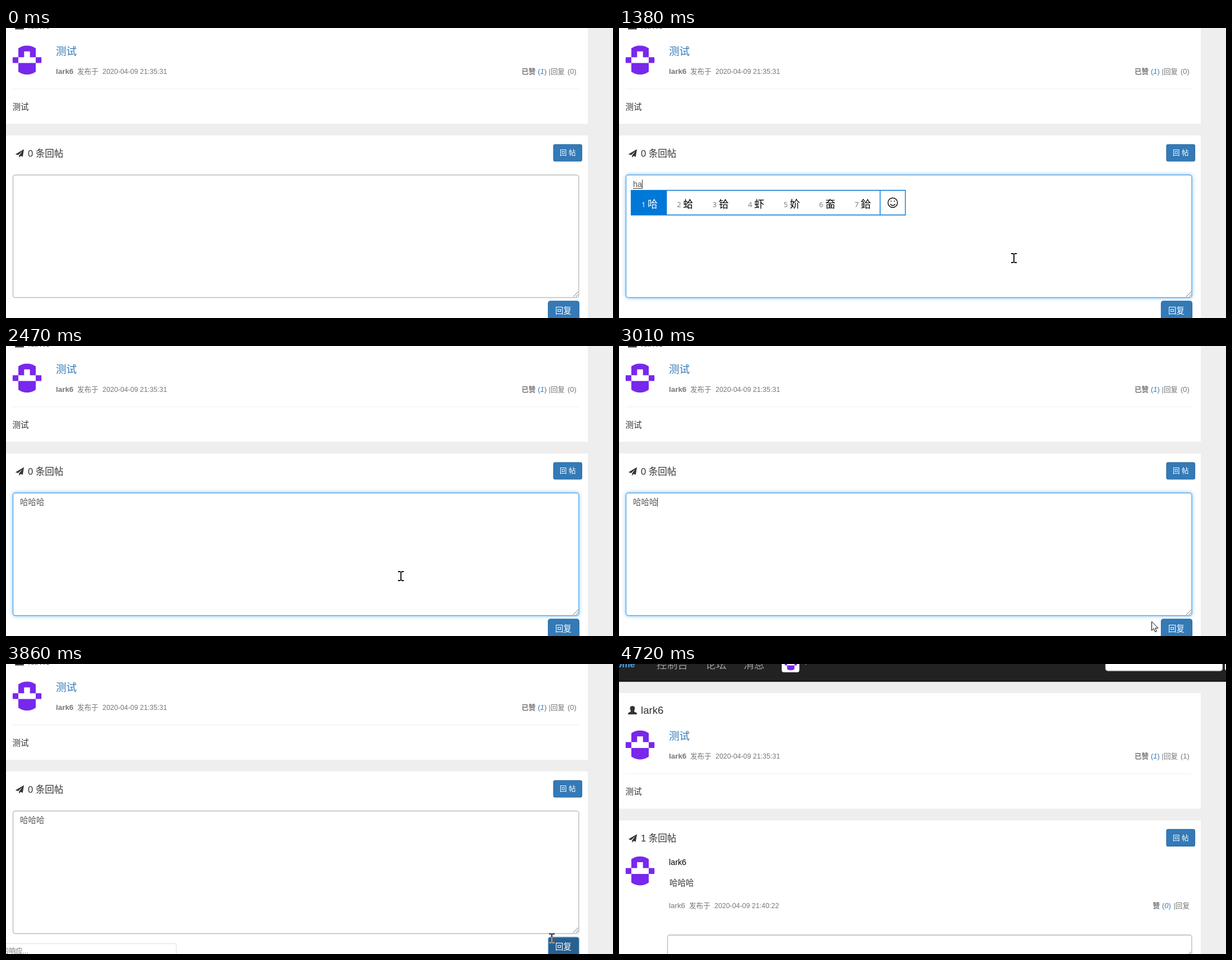
An HTML page that plays this animation: 1082x518 px, repeating every 5270 ms.

```html
<!DOCTYPE html>
<html lang="zh-CN">
<head>
<meta charset="utf-8">
<title>回帖</title>
<style>
html, body { margin: 0; height: 100%; overflow: hidden; background: #eee; }
svg { display: block; }
text { font: 12.6px "Liberation Sans", "Noto Sans CJK SC", "Noto Sans CJK", sans-serif; fill: #777; white-space: pre; }
.body { font-size: 14.5px; fill: #333; }
.head { font-size: 16.5px; fill: #333; }
.title { font-size: 18.6px; fill: #337ab7; }
.name { font-size: 13.4px; }
.date { font-size: 12.4px; }
.side { font-size: 12.9px; }
.nav { font-size: 18.7px; fill: #9d9d9d; }
.bold { font-weight: bold; }
.link { fill: #337ab7; }
.white { fill: #fff; }
.link tspan { font-style: italic; }
.btn { fill: #337ab7; stroke: #2e6da4; stroke-width: 1.2; }
.box { fill: #fff; stroke: #bbb; stroke-width: 1.4; }
.num { font: 13px "Open Sans", "Noto Sans", sans-serif; fill: #767676; }
.word { font-size: 18px; fill: #000; }
.first { fill: #fff; }
#beam { mix-blend-mode: difference; }
</style>
</head>
<body>
<svg width="1082" height="518" viewBox="0 0 1082 518">
  <defs>
    <clipPath id="round"><circle r="26"/></clipPath>
    <path id="avatar" clip-path="url(#round)" fill="#7828ec"
      d="M-15.5-26h31v21h-10.3v-10.4h-10.4v10.4h-10.3zM-26-5h10.5v10.4h-10.5zM15.5-5h10.5v10.4h-10.5zM-15.5 5.4h31v21h-31z"/>
    <path id="grip" d="M0 9L9 0M5 9l4-4" stroke="#777" fill="none"/>
  </defs>
  <rect width="1082" height="518" fill="#eee"/>

  <g id="shared">
    <rect y="-35.4" width="1037" height="206.4" fill="#fff"/>
    <rect y="192" width="1037" height="400" fill="#fff"/>
    <path fill="#333" d="M24-12.5c5 0 5 4 3.500 7.500-.8 2-.8 2.500 1 3.300 2.500 1 3.500 1.500 3.500 4.200h-16c0-2.700 1-3.200 3.500-4.200 1.800-.8 1.800-1.300 1-3.300-1.500-3.500-1.500-7.500 3.500-7.500z"/>
    <text class="title" style="fill:#333" x="39" y="1.300">lark6</text>
    <use href="#avatar" x="37.500" y="57.200"/>
    <text class="title" x="89" y="48">测试</text>
    <text class="name bold" x="89" y="81.800">lark6</text>
    <text x="127" y="81.600">发布于</text>
    <text class="date" x="172" y="81.600">2020-04-09 21:35:31</text>
    <text class="bold" x="919" y="81.600">已赞</text>
    <text class="side link" x="948" y="81.600">(<tspan>1</tspan>)</text>
    <text class="side" x="967.500" y="81.600">|</text>
    <text x="971" y="81.600">回复</text>
    <text class="side" id="replies" x="1016.700" y="81.600" text-anchor="end"></text>
    <path d="M12 108.700H1021" stroke="#eee"/>
    <text class="body" x="11.500" y="145.500">测试</text>
    <path fill="#333" d="M32 216.500L16.800 225.500l4.700 1.600 8-7.300-6.300 8 .1 3.700 2.700-2.900 3.800 1.400z"/>
    <text class="head" id="count" x="39" y="229.800"></text>
    <rect class="btn" x="976" y="208" width="50.500" height="30" rx="3"/>
    <text class="white" x="987" y="227.300">回 帖</text>
  </g>

  <g id="form">
    <rect class="box" id="area" x="12.500" y="262.500" width="1008.500" height="219" rx="4"/>
    <path id="inset" d="M15 264H1019" stroke="#f0f0f0"/>
    <use href="#grip" x="1011" y="471"/>
    <text class="body" id="typed" style="fill:#555" x="25" y="284"></text>
    <path id="under" stroke="#333" fill="none"/>
    <rect id="caret" y="271" width="1" height="16" fill="#333"/>
    <g id="ime"></g>
    <rect class="btn" id="send" x="966.500" y="487.800" width="55" height="36" rx="4"/>
    <text class="body white" x="979" y="510.300">回复</text>
  </g>

  <g id="posted">
    <rect width="1082" height="30.500" fill="#222"/>
    <rect y="30" width="1082" height="1.700" fill="#080808"/>
    <text class="bold" style="font-size:16px;fill:#4aa3e8" x="28.500" y="6" text-anchor="end">Home</text>
    <text class="nav" x="67" y="7.500">控制台</text>
    <text class="nav" x="154" y="7.500">论坛</text>
    <text class="nav" x="222" y="7.500">消息</text>
    <rect x="290" y="-17" width="31.500" height="31.700" rx="4" fill="#fff"/>
    <use href="#avatar" transform="translate(306.200 .3) scale(.42)"/>
    <path d="M329-2.500h8l-4 4z" fill="#9d9d9d"/>
    <rect class="box" x="867.500" y="-20" width="208" height="32" rx="4" style="stroke:#ccc"/>
    <rect x="1080" y="-20" width="20" height="32" rx="4" fill="#fff"/>
    <use href="#avatar" x="37.500" y="369.500"/>
    <text class="body" style="font-size:14.300px;fill:#000" x="89" y="358.700">lark6</text>
    <text class="body" x="90" y="395.500">哈哈哈</text>
    <text class="name" x="89" y="436.200">lark6</text>
    <text x="125" y="436">发布于</text>
    <text class="date" x="170" y="436">2020-04-09 21:40:22</text>
    <text class="bold" x="951.500" y="436">赞</text>
    <text class="side link" x="968" y="436">(<tspan>0</tspan>)</text>
    <text x="1017" y="436" text-anchor="end">|回复</text>
    <rect class="box" x="86.500" y="484" width="934.500" height="40" rx="4"/>
    <path d="M88 485.500H1019" stroke="#f0f0f0"/>
    <use href="#grip" x="1011" y="514"/>
  </g>

  <g id="status">
    <rect x="-5" y="499.500" width="308.500" height="30" rx="3" fill="#fff" stroke="#ddd"/>
    <text class="date" x="-7.500" y="517">的响应...</text>
  </g>

  <circle id="click" r="13" fill="#ffe600" fill-opacity=".55"/>
  <path id="beam" d="M-5-8h4M1-8h4M-5 8h4M1 8h4M0-8V8" stroke="#fff" stroke-width="1.800" fill="none"/>
  <path id="arrow" d="M0 0v16l3.700-3.500 2.500 6 2.600-1.100-2.500-5.700h5.200z" fill="#fff" stroke="#000"/>
  <path id="hand" d="M-1.500 1c0-2 3-2 3 0v6l7 1.500c2 .5 2.500 1.500 2.500 3.500l-1.500 8h-9l-6-8c-1-2 1-3 2.500-1.500l1.500 1.500z" fill="#fff" stroke="#222" stroke-width=".7"/>
</svg>
<script>
const LOOP = 5270, FOCUS = 390, COMMIT = 1920, HOVER = 3160, PRESS = 3310, BLUR = 3390, RELEASE = 3480, RELOAD = 3950;
const $ = id => document.getElementById(id);
const show = (id, on) => $(id).style.display = on ? '' : 'none';
const within = (t, a, b) => t >= a && t < b;
const clamp = v => Math.max(0, Math.min(1, v));

// start time, typed letters, candidate words
const typing = [
  [1230, 'h', ''],
  [1300, 'h', '和 会 好 后 还 很 或'],
  [1380, 'ha', '哈 蛤 铪 虾 妎 奤 鉿'],
  [1460, 'hah', '哈哈 哈哈哈 哈哈镜 哈哈笑 哈 蛤 铪'],
  [1540, 'haha', '哈哈 哈哈哈 哈哈哈哈 哈哈大笑 哈哈一笑 哈哈镜 哈哈哈哈哈'],
  [1610, 'hahah', '哈哈 哈哈哈 哈哈哈哈 哈哈大笑 哈哈一笑 哈哈镜 哈哈哈哈哈'],
  [1690, 'hahaha', '哈哈哈 哈哈 哈哈镜 哈哈笑 哈 蛤 铪']
];

// start, end, steps, from x, y, to x, y
const legs = [
  [70, 310, 3, 800, 545, 704, 411],
  [2620, 3080, 6, 704, 411, 964, 497],
  [3160, 3310, 2, 964, 497, 978, 503],
  [3560, 3790, 3, 978, 503, 973, 490],
  [3950, 4200, 3, 973, 490, 802, 403],
  [4260, 4340, 1, 802, 403, 669, 350],
  [4500, 4720, 3, 669, 350, 835, 545]
];

function pointer(t) {
  const leg = legs.filter(l => l[0] <= t).pop();
  if (!leg) return [0, 600];
  const [a, b, n, x, y, x2, y2] = leg;
  const u = Math.min(1, (Math.floor((t - a) / (b - a) * n + 1e-6) + 1) / (n + 1));
  const e = u * u * (3 - 2 * u);
  return [x + (x2 - x) * e, y + (y2 - y) * e];
}

function candidates(list) {
  if (!list) return '';
  let x = 22, cells = '';
  list.split(' ').forEach((word, i) => {
    const w = 63.35 + 18 * (word.length - 1), first = i ? '' : ' first';
    if (!i) cells += `<rect x="22" y="290" width="${w}" height="44" fill="#0078d7"/>`;
    cells += `<text class="num${first}" x="${x + 18}" y="320">${i + 1}</text>
      <text class="word${first}" x="${x + 29}" y="321">${word}</text>`;
    x += w;
  });
  return `<rect x="21.700" y="290" width="${x + 23.5}" height="44" fill="#fff"/>${cells}
    <path d="M21.700 290H${x + 45}V334H21.700zM${x} 290v44" fill="none" stroke="#0078d7" stroke-width="1.400"/>
    <g transform="translate(${x + 22.5} 312)" fill="none" stroke="#000" stroke-width="1.400">
      <circle r="8.500"/><path d="M-4.500 2.500q4.500 5 9 0M-3-3.500v2M3-3.500v2"/></g>`;
}

let popup = '';
function input(t) {
  const step = t < COMMIT && typing.filter(s => s[0] <= t).pop();
  const text = t >= COMMIT ? '哈哈哈' : step ? step[1] : '';
  const width = t >= COMMIT ? 43.5 : text.length * 8.06;
  const list = step ? step[2] : '';
  $('typed').textContent = text;
  $('under').setAttribute('d', step ? `M25 286.500h${width}` : '');
  $('caret').setAttribute('x', Math.floor(25 + width));
  show('caret', within(t, FOCUS, 920) || within(t, 1230, 2470) || within(t, 3000, BLUR - 80));
  if (list !== popup) $('ime').innerHTML = candidates(popup = list);

  const glow = clamp((t - FOCUS) / 150) * (1 - clamp((t - BLUR - 50) / 120));
  const mix = (a, b) => Math.round(a + (b - a) * clamp(glow * 2));
  const area = $('area').style;
  area.stroke = `rgb(${mix(187, 92)},${mix(187, 170)},${mix(187, 230)})`;
  area.filter = glow ? `drop-shadow(0 0 3.500px rgba(102,175,233,${0.75 * glow}))` : 'none';
  show('inset', glow < 0.5);
}

function draw(t) {
  const posted = t >= RELOAD;
  $('shared').setAttribute('transform', `translate(0 ${posted ? 87.4 : 0})`);
  $('replies').textContent = `(${+posted})`;
  $('count').textContent = `${+posted} 条回帖`;
  show('form', !posted);
  show('posted', posted);
  show('status', within(t, 3560, 4570));
  if (!posted) input(t);

  const send = $('send').style;
  send.fill = t < HOVER ? '' : within(t, PRESS, RELEASE) ? '#204d74' : '#286090';
  send.stroke = t < HOVER ? '' : t < PRESS ? '#204d74' : '#79abe0';

  const [x, y] = pointer(t);
  const kind = posted ? 'arrow' : t >= 3640 || y < 482 ? 'beam' : x > 966 && y > 487 ? 'hand' : 'arrow';
  for (const id of ['beam', 'arrow', 'hand']) {
    show(id, id === kind);
    $(id).setAttribute('transform', `translate(${x} ${y})`);
  }
  $('click').setAttribute('transform', `translate(${x + 2} ${y - 2})`);
  show('click', within(t, FOCUS, 470) || within(t, PRESS, RELEASE));
}

const start = performance.now();
function frame() {
  draw((performance.now() - start) % LOOP);
  requestAnimationFrame(frame);
}
frame();
</script>
</body>
</html>
```
